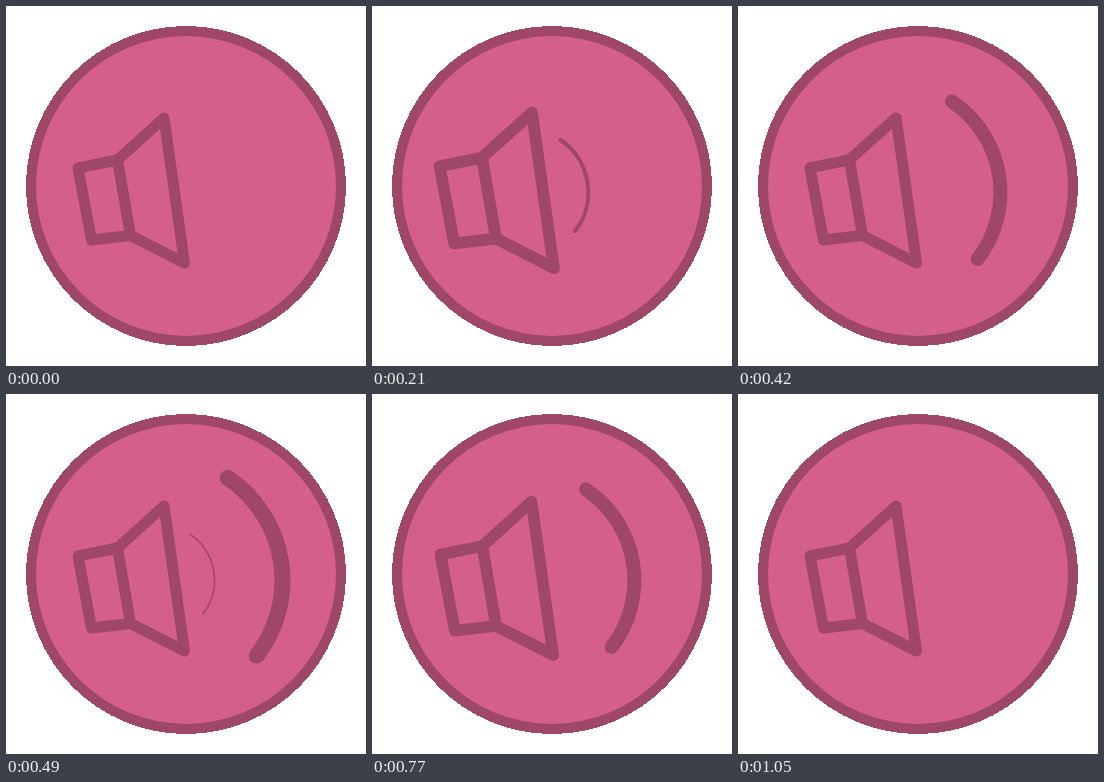
An HTML page for the animation above (1.12 s loop, 360 by 360 pixels).

```html
<!DOCTYPE html>
<html lang="en">
<head>
<meta charset="utf-8">
<title>Speaker pulse</title>
<style>
  html, body { margin: 0; width: 100%; height: 100%; overflow: hidden; background: #fff; }
  svg { display: block; width: 100vw; height: 100vh; }
  .line { fill: none; stroke: #9f4769; stroke-linecap: round; stroke-linejoin: round; }
</style>
</head>
<body>
<svg viewBox="0 0 360 360">
  <circle cx="180" cy="180" r="160" fill="#9f4769" shape-rendering="crispEdges"/>
  <circle cx="180" cy="180" r="150" fill="#d55f8b"/>
  <path id="speaker" class="line" stroke-width="11"
    d="M111.5 154L72 162L85.5 234L124.5 229.5ZL158 112L178.5 257L124.5 229.5"/>
  <path class="line wave"/>
  <path class="line wave"/>
</svg>
<script>
const STEP = 70, STEPS = 16, WAVE_DELAY = 5;
const widths = [0, 0, 1.5, 4, 6.5, 10, 14, 16, 9.5, 3.5, 0];
const speaker = document.getElementById('speaker');
const waves = document.querySelectorAll('.wave');

// Cosine ease from 0 to 1 between times a and b
const ease = (t, a, b) => {
  const x = Math.min(1, Math.max(0, (t - a) / (b - a)));
  return (1 - Math.cos(Math.PI * x)) / 2;
};

const beat = (t, start, peak, end) => ease(t, start, peak) - ease(t, peak, end);

const point = (radius, degrees) => {
  const a = degrees * Math.PI / 180;
  return `${153 + radius * Math.cos(a)} ${186.3 + radius * Math.sin(a)}`;
};

function drawWave(path, t) {
  const r = 54 + 81 * ease(t, 1.35, 8.85);
  const width = widths[t] || 0;
  path.setAttribute('d', `M${point(r, -56.1)}A${r} ${r} 0 0 1 ${point(r, 37.6)}`);
  path.setAttribute('stroke-width', width);
  path.setAttribute('visibility', width ? 'visible' : 'hidden');
}

function draw(now) {
  const t = Math.floor(now / STEP) % STEPS;
  const scale = 1 + 0.073 * (beat(t, 0, 3, 6.3) + beat(t, 7, 9.7, 14));
  speaker.setAttribute('transform', `translate(132 187) scale(${scale}) translate(-132 -187)`);
  waves.forEach((path, i) => drawWave(path, t - i * WAVE_DELAY));
}

const start = performance.now();
function tick() {
  draw(performance.now() - start);
  requestAnimationFrame(tick);
}
tick();
</script>
</body>
</html>
```
